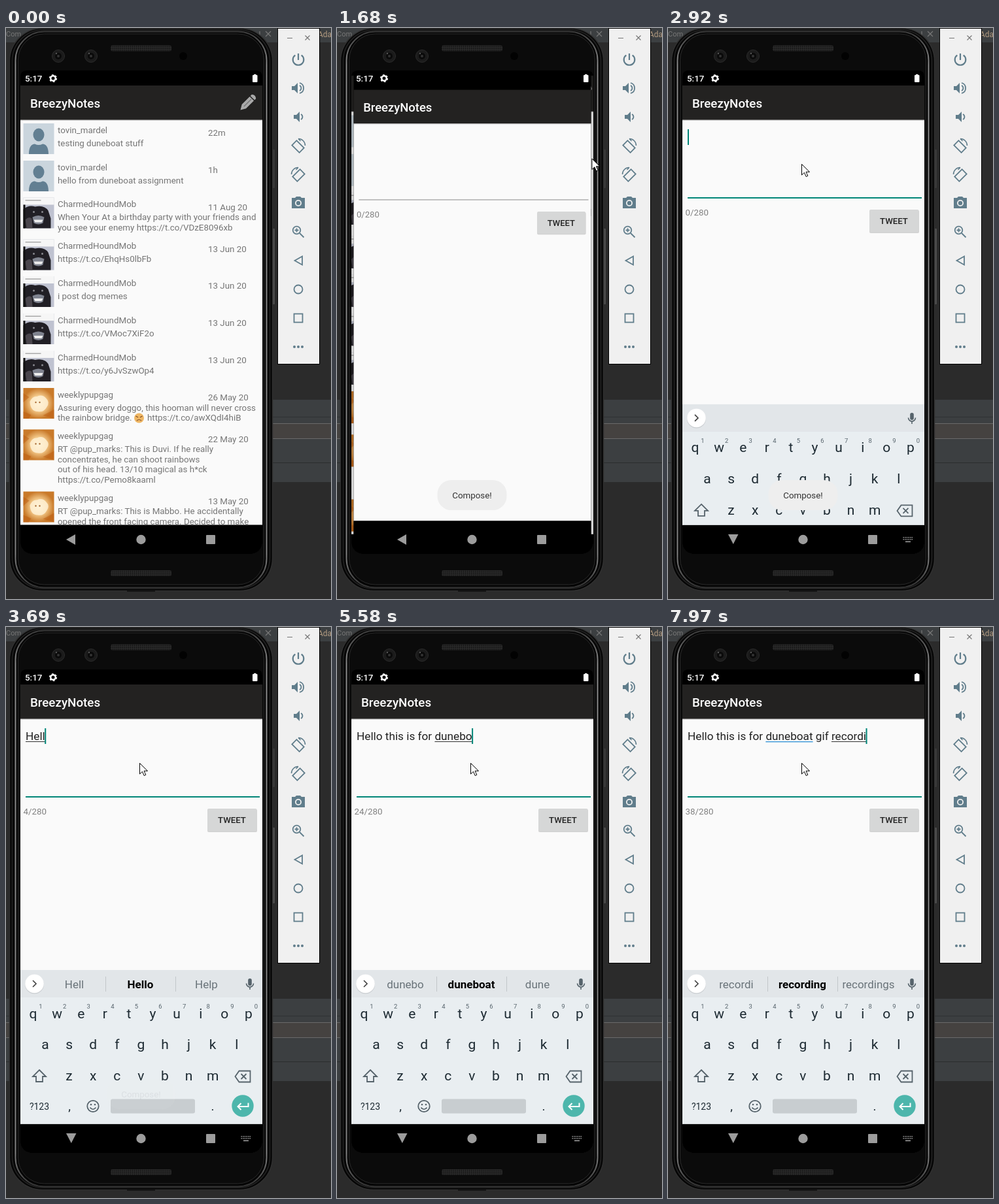
These frames come from a looping animation (497x874 px, 8000 ms). An HTML page:

```html
<!DOCTYPE html>
<html lang="en">
<head>
<meta charset="utf-8">
<title>Compose screen</title>
<style>
html, body { margin: 0; height: 100%; overflow: hidden; background: #2b2b2b; }
svg { display: block; width: 497px; height: 874px; font-family: Roboto, "Noto Sans", sans-serif; }
text { white-space: pre; }
.line { fill: none; stroke: #607d8b; stroke-width: 1.8; }
.mid { text-anchor: middle; }
</style>
</head>
<body>
<svg id="stage" viewBox="0 0 497 874" xmlns="http://www.w3.org/2000/svg"></svg>
<script>
const LOOP = 8000;
const FULL = 'Hello this is for duneboat gif recording';
// Start of each word, the word, and the alternative offered on the right
const WORDS = [[0, 'Hello', 'Help'], [6, 'this', 'that'], [11, 'is', 'it'], [14, 'for', 'from'],
  [18, 'duneboat', 'dune'], [27, 'gif', 'gift'], [31, 'recording', 'recordings']];
// Time, characters typed, mistyped extra
const KEYS = [[0, 0], [3230, 1], [3310, 2], [3540, 3], [3690, 4], [3770, 6], [3860, 7],
  [4010, 8], [4090, 9], [4160, 10], [4390, 11], [4470, 12], [4550, 13], [4620, 14], [4760, 16],
  [4840, 18], [4910, 19], [5110, 21], [5170, 22], [5410, 23], [5580, 24], [5660, 25], [5730, 26],
  [5810, 27], [6500, 27, 'b'], [6580, 27, 'bi'], [6810, 27, 'b'], [6890, 27], [6960, 28], [7040, 29],
  [7110, 30], [7190, 31], [7340, 32], [7420, 33], [7590, 34], [7660, 35], [7740, 36], [7890, 37], [7970, 38]];
// Pointer path: time, x, y
const PATH = [[70, 240, 806], [300, 300, 520], [560, 432, 68], [830, 366, 112], [980, 366, 112],
  [1450, 405, 160], [1680, 390, 200], [1780, 380, 204], [2260, 204.5, 208.5]];

const text = (x, y, s, size, fill, more = '') =>
  `<text x="${x}" y="${y}" font-size="${size}" fill="${fill}" ${more}>${s}</text>`;
const rect = (x, y, w, h, fill, more = '') =>
  `<rect x="${x}" y="${y}" width="${w}" height="${h}" fill="${fill}" ${more}/>`;
const circle = (x, y, r, fill, more = '') => `<circle cx="${x}" cy="${y}" r="${r}" fill="${fill}" ${more}/>`;
const path = (d, fill, more = '') => `<path d="${d}" fill="${fill}" ${more}/>`;
const group = (more, s) => `<g ${more}>${s}</g>`;
const stroke = (c, w) => `stroke="${c}" stroke-width="${w}"`;

function desktop() {
  return rect(0, 0, 497, 874, '#2b2b2b') + rect(0, 0, 497, 22, '#3c3f41') +
    text(0, 13, 'Com', 11, '#777') + text(477, 14, 'Ada', 12, '#b19a80') +
    path('M397 5l8 8m0-8l-8 8M388 5v8', 'none', stroke('#777', 1.2)) +
    rect(0, 569, 497, 126, '#3c3f41') + rect(0, 595, 497, 1, '#2f3133') +
    rect(-2, 605.5, 501, 23, '#454240', stroke('#6a6a6a', 1)) + rect(0, 665, 497, 1, '#2b2d2e');
}

function phone() {
  let s = rect(407, 186, 4, 59, '#3a3a3a', 'rx="1"') + rect(407, 307, 4, 116, '#4c4c4c', 'rx="1"') +
    rect(5.5, 0.5, 402, 861, '#050505', 'rx="50" ' + stroke('#303030', 1.5)) +
    rect(9.5, 3, 394, 855, 'none', 'rx="47" ' + stroke('#1f1f1f', 2)) +
    rect(14.5, 5.5, 384, 851, 'none', 'rx="44" stroke="url(#rim)" stroke-width="2"') +
    rect(18.5, 9, 376, 843, '#0b0b0b', 'rx="40" ' + stroke('#2a2a2a', 1)) +
    rect(185, 861, 43, 2, '#151515');
  for (const y of [26.5, 830]) s += rect(160, y, 93, 9, 'url(#grill)', 'rx="3"');
  for (const x of [80, 130]) {
    s += circle(x, 43, 9.5, '#1b1b1b', stroke('#2c2c2c', 1)) + circle(x, 43, 5, '#0a0a0a') +
      circle(x, 43, 2, '#333') + circle(x - 3, 39, 1.2, '#555');
  }
  return s + circle(271, 43, 6, '#020202');
}

function toolPanel() {
  const icons = [
    path('M12 3v10M7.3 5.6a8.3 8.3 0 1 0 9.4 0', 'none', 'class="line" style="stroke-width:2.2"'),
    path('M2 9v6h4l5 5V4L6 9z', '#607d8b') + path('M14 8a4.5 4.5 0 0 1 0 8M14 4a8.3 8.3 0 0 1 0 16', 'none', 'class="line"'),
    path('M5 9v6h4l5 5V4L9 9z', '#607d8b') + path('M16 8a4.5 4.5 0 0 1 0 8', 'none', 'class="line"'),
    rotateIcon(''), rotateIcon('transform="matrix(-1 0 0 1 24 0)"'),
    path('M2 4h5l2-2h6l2 2h5v16H2z', '#607d8b') + circle(12, 12, 4.1, 'none', stroke('#f0f0f0', 1.8)),
    path('M14 14l6.500 6.500M6.500 9.500h6M9.500 6.500v6', 'none', 'class="line"') + circle(9.5, 9.5, 5.8, 'none', 'class="line"'),
    path('M18 5.500v13L6.500 12z', 'none', 'class="line"'),
    circle(12, 12, 6.5, 'none', 'class="line"'),
    rect(5.5, 5.5, 13, 13, 'none', 'class="line"'),
    [6, 12, 18].map(x => circle(x, 12, 2, '#607d8b')).join('')
  ];
  return rect(415.5, 0.5, 64, 514, '#f0f0f0', stroke('#000', 1)) +
    path('M430 15.500h8M457.500 11.500l7 7m0-7l-7 7', 'none', stroke('#777', 1.2)) +
    icons.map((s, i) => group(`transform="translate(435 ${36 + 44 * i})"`, s)).join('');
}

function rotateIcon(more) {
  return group(more, rect(3.5, 8.5, 16, 10, 'none', 'class="line" transform="rotate(45 11.500 13.500)"') +
    path('M12 1.500a10.500 10.500 0 0 1 10.500 10.500M12 1.500l3.500 3.500', 'none', 'class="line" style="stroke-width:1.5"'));
}

// Avatars, 47 by 47
const person = rect(0, 0, 47, 47, '#cad5dd') +
  '<ellipse cx="23.500" cy="17.500" rx="8.500" ry="10" fill="#627f92"/>' +
  path('M8.500 47c0-11 4-15.500 9-15.500q6 3 12 0c5 0 9 4.500 9 15.500z', '#627f92');
const darkDog = rect(0, 0, 47, 47, '#bfc2d0') + rect(0, 0, 47, 11, '#f6f6f6') + rect(3, 3.5, 24, 1.5, '#aaa') +
  path('M0 18q8-7 18-4 14-3 20 6l4 12v15H0z', '#211f25') + path('M3 34q5-6 10-2l1 15H5z', '#4a464d') +
  circle(16, 22, 1.5, '#8a8a90') + circle(29, 22, 1.5, '#8a8a90') +
  path('M14 30q9-5 18 0l-2 9q-7 4-14 0z', '#7f838f') + path('M16 34h14l-2 4H18z', '#eee') +
  rect(0, 11, 3, 36, '#111');
const fireDog = rect(0, 0, 47, 47, 'url(#fire)') +
  path('M0 8l9 6-9 8zM0 36l12 5-4 6H0zM30 42l17-9v14z', '#b9570f', 'opacity=".45"') +
  path('M10 21q4-9 11-8 8-4 14 3 6 6 1 13-5 9-14 7-11 0-12-15z', '#fff3d8', 'opacity=".8"') +
  circle(19, 22, 1.2, '#a86b35') + circle(25, 22, 1.2, '#a86b35');

function list() {
  const me = 'tovin_mardel', mob = 'CharmedHoundMob', gag = 'weeklypupgag', url = 'https://t.co/';
  const rows = [
    [146, person, me, '22m', ['testing duneboat stuff']],
    [203, person, me, '1h', ['hello from duneboat assignment']],
    [259.5, darkDog, mob, '11 Aug 20', ['When Your At a birthday party with your friends and', 'you see your enemy ' + url + 'VDzE8096xb']],
    [323.5, darkDog, mob, '13 Jun 20', [url + 'EhqHs0lbFb']],
    [380, darkDog, mob, '13 Jun 20', ['i post dog memes']],
    [437, darkDog, mob, '13 Jun 20', [url + 'VMoc7XiF2o']],
    [494, darkDog, mob, '13 Jun 20', [url + 'y6JvSzwOp4']],
    [551, fireDog, gag, '26 May 20', ['Assuring every doggo, this hooman will never cross', 'the rainbow bridge.']],
    [614.5, fireDog, gag, '22 May 20', ['RT @pup_marks: This is Duvi. If he really', 'concentrates, he can shoot rainbows', 'out of his head. 13/10 magical as h*ck', url + 'Pemo8kaaml']],
    [709.5, fireDog, gag, '13 May 20', ['RT @pup_marks: This is Mabbo. He accidentally', 'opened the front facing camera. Decided to make']]
  ];
  const gray = '#757575', size = 13.35;
  return rows.map(([y, pic, name, date, lines]) =>
    group(`transform="translate(26.5 ${y})"`, pic) + text(79, y + 14.5, name, size, gray) +
    text(309, y + 19, date, size, gray) +
    lines.map((s, i) => text(79, y + 34.5 + 15.7 * i, s, size, gray)).join('')).join('') +
    text(216, 601.2, url + 'awXQdI4hiB', size, gray) + circle(203.5, 597, 7.5, '#efb765') +
    path('M198.500 594l3.500 2m6.500-2l-3.500 2M200 601q3.500-3 7 0', 'none', stroke('#7d4a26', 1.2));
}

// A window: black system bars, title bar and body
function screen(body, more) {
  return rect(22, 65, 370, 740, '#000') + rect(22, 140, 370, 620.7, '#fafafa') + body +
    rect(22, 760.7, 370, 44.3, '#000') + rect(22, 88, 370, 52.6, '#232221') +
    rect(22, 140.6, 370, 1.4, '#000', 'opacity=".14"') +
    text(37, 122, 'BreezyNotes', 18.8, '#fff', 'font-weight="500"') + more;
}

const pencil = group('transform="translate(369.500 114.500) rotate(45)"',
  path('M-4.500-9h9V8L0 15.500l-4.500-7.500zM-4.500-10.500v-3q4.500-4 9 0v3z', '#a9a9a9') +
  path('M0-8V8', 'none', stroke('#666', 1)));

const composer = rect(30, 259, 358, 2, '#008577', 'id="rule"') +
  rect(308, 279, 76, 35, '#000', 'rx="2" opacity=".16"') + rect(308, 278, 75.5, 34.5, '#d6d7d7', 'rx="2"') +
  text(345.5, 300, 'TWEET', 13.2, '#222', 'class="mid" font-weight="500"') +
  text(26.5, 287, '0/280', 13.35, '#808080', 'id="count"') +
  rect(149, 175, 0, 1.3, '#2d8fd5', 'id="flag"') + rect(30, 175, 0, 1, '#333', 'id="under"') +
  text(30, 173, '', 17.2, '#212121', 'id="typed"') + rect(30, 155, 2, 24, '#008577', 'id="caret"');

function keyboard() {
  const ink = '#1d2a32', soft = '#56636b';
  const row = (keys, x, y) => [...keys].map((c, i) => text(x + 36.6 * i, y, c, 21, ink, 'class="mid"')).join('');
  return rect(22, 525, 370, 236, '#e9eef1') + rect(22, 525, 370, 42, '#e2e6e9') +
    circle(43.5, 547, 14.5, '#c9cdd0') + circle(43.5, 546, 14.3, '#fff') +
    path('M41 541l5 5-5 5', 'none', stroke('#444', 1.7)) +
    group('id="hints"', rect(152, 535, 1, 23, '#c2c7ca') + rect(259, 535, 1, 23, '#c2c7ca') +
      text(104.5, 553, '', 17, '#697379', 'class="mid"') + text(205.5, 553, '', 17, '#000', 'class="mid" font-weight="700"') +
      text(306.5, 553, '', 17, '#697379', 'class="mid"')) +
    rect(370.2, 538, 5.6, 11, soft, 'rx="2.800"') + path('M367.500 545.500a5.500 5.500 0 0 0 11 0M373 551v4', 'none', stroke(soft, 1.6)) +
    row('qwertyuiop', 41.5, 598.5) + row('asdfghjkl', 60, 646) + row('zxcvbnm', 96.5, 694) +
    [...'1234567890'].map((c, i) => text(53 + 36.6 * i, 584, c, 9.5, soft, 'class="mid"')).join('') +
    path('M51 678l10 10h-5v8h-10v-8h-5z', 'none', stroke(soft, 1.8)) +
    path('M350.500 688l6-8.500h17v17h-17zM359.500 684l8 8m0-8l-8 8', 'none', stroke(soft, 1.8)) +
    text(51, 738.5, '?123', 14, ink, 'class="mid"') + text(97, 740, ',', 19, ink, 'class="mid"') +
    circle(133, 733.5, 8.7, 'none', stroke(soft, 1.8)) + circle(130, 731, 1.3, soft) + circle(136, 731, 1.3, soft) +
    path('M128.500 735.500q4.500 5.500 9 0', 'none', stroke(soft, 1.6)) +
    rect(160, 722.5, 129, 22, '#c8cdd0', 'rx="3"') + text(316, 740, '.', 19, ink, 'class="mid"') +
    circle(362, 733, 16.7, '#4db6ac') + path('M370.500 728.500v5.500h-16m5-5l-5 5 5 5', 'none', stroke('#fff', 2));
}

function systemIcons() {
  const gray = '#9c9c9c';
  let dots = '';
  for (let i = 0; i < 12; i++) dots += rect(359.5 + i % 6 * 2.6, 779 + (i / 6 | 0) * 3, 1.5, 1.5, gray);
  return text(29, 82, '5:17', 13.4, '#fff', 'font-weight="500"') +
    circle(72, 77, 3.7, 'none', stroke('#fff', 2.4)) +
    circle(72, 77, 5.2, 'none', stroke('#fff', 1.8) + ' stroke-dasharray="2.700 2.740"') +
    rect(377, 72, 7.5, 11, '#fff', 'rx="1"') + rect(379, 70.8, 3.5, 2, '#fff') +
    path('M92 783l14-8v16z', gray, 'id="back"') + path('M92 775h15.500l-7.700 15z', gray, 'id="down"') +
    circle(206.5, 783, 7.2, gray) + rect(306, 776, 14, 14, gray, 'rx="1"') +
    group('id="switch"', dots + rect(363, 785.5, 8, 1.6, gray));
}

const stage = document.getElementById('stage');
stage.innerHTML = `<defs>
  <clipPath id="glass"><path d="M22 75q0-10 10-10h350q10 0 10 10v708q0 22-22 22H44q-22 0-22-22z"/></clipPath>
  <clipPath id="above"><rect x="22" y="65" width="370" height="695.7"/></clipPath>
  <linearGradient id="rim" x2="0" y2="1"><stop stop-color="#3a3a3a"/><stop offset=".06" stop-color="#8a8a8a"/><stop offset=".94" stop-color="#808080"/><stop offset="1" stop-color="#333"/></linearGradient>
  <radialGradient id="fire"><stop stop-color="#ffefcf"/><stop offset=".5" stop-color="#f3c98a"/><stop offset="1" stop-color="#c97a2a"/></radialGradient>
  <pattern id="grill" width="3" height="3" patternUnits="userSpaceOnUse"><rect width="3" height="3" fill="#2b2b2b"/><circle cx="1.500" cy="1.500" r="1" fill="#111"/></pattern>
</defs>` + desktop() + phone() + group('clip-path="url(#glass)"',
  group('id="home"', screen(list(), circle(369.5, 114.5, 22, '#fff', 'id="ripple"') + pencil)) +
  rect(22, 65, 370, 740, '#000', 'id="dim"') +
  group('id="compose"', screen(composer, '')) +
  group('clip-path="url(#above)"', group('id="keys"', keyboard())) +
  systemIcons() +
  group('id="toast"', rect(153.5, 692, 106, 46, '#eeeeee', 'rx="21"') + text(206.5, 720, 'Compose!', 13.35, '#333', 'class="mid"'))
) + toolPanel() + path('M0 0v16.500l4-3.700 2.700 6.200 2.600-1.200-2.700-6h5.400z', '#fff', 'id="mouse" ' + stroke('#000', 1));

const el = {};
for (const node of stage.querySelectorAll('[id]')) el[node.id] = node;
const hints = el.hints.querySelectorAll('text');
const set = (id, name, value) => el[id].setAttribute(name, value);
const show = (id, on) => set(id, 'opacity', on ? 1 : 0);
const clamp = v => Math.max(0, Math.min(1, v));
const ramp = (t, a, b) => clamp((t - a) / (b - a));
const easeOut = u => 1 - (1 - u) * (1 - u);
const zoom = (id, k) => set(id, 'transform', `translate(207 435) scale(${k}) translate(-207 -435)`);

function drawTyping(t) {
  const [, n, extra = ''] = KEYS.findLast(k => k[0] <= t);
  const s = FULL.slice(0, n) + extra;
  const [start, word, alt] = WORDS.findLast(w => w[0] < Math.max(n, 1));
  const from = extra ? n : start;
  el.typed.textContent = s;
  el.count.textContent = s.length + '/280';
  const at = i => i ? 30 + el.typed.getSubStringLength(0, i) : 30;
  const end = at(s.length);
  set('caret', 'x', s ? end - 0.5 : 30);
  set('under', 'x', at(from));
  set('under', 'width', s && !s.endsWith(' ') ? end - at(from) : 0);
  // A finished unknown word keeps a blue line
  const flagged = n > 26;
  if (flagged) set('flag', 'x', at(18));
  set('flag', 'width', flagged ? at(26) - at(18) : 0);
  show('hints', s);
  const offer = extra ? ['bi', 'bit', 'big'] : [FULL.slice(start, n).trim(), word, alt];
  hints.forEach((h, i) => h.textContent = offer[i]);
}

function drawMouse(t) {
  show('mouse', t >= PATH[0][0]);
  const i = PATH.findLastIndex(p => p[0] <= t);
  if (i < 0) return;
  const a = PATH[i], b = PATH[i + 1] || a;
  const u = b === a ? 0 : ramp(t, a[0], b[0]);
  set('mouse', 'transform', `translate(${a[1] + (b[1] - a[1]) * u} ${a[2] + (b[2] - a[2]) * u})`);
}

function draw(t) {
  const open = ramp(t, 1488, 1788), p = easeOut(open);
  zoom('home', 1 + 0.05 * p);
  zoom('compose', 0.85 + 0.15 * p);
  set('dim', 'opacity', 0.18 * p);
  set('compose', 'opacity', clamp(open * 4));

  set('ripple', 'r', 10 + 14 * ramp(t, 980, 1150));
  set('ripple', 'opacity', t < 980 ? 0 : 0.2 * (1 - ramp(t, 1150, 1400)));
  set('toast', 'opacity', ramp(t, 1280, 1440) * (1 - ramp(t, 3440, 3710)));

  const focus = t >= 2450;
  set('rule', 'fill', focus ? '#008577' : '#9a9a9a');
  set('rule', 'height', focus ? 2 : 1.2);
  show('caret', focus && !(t >= 6270 && t < 6500));
  show('switch', focus);

  const rise = easeOut(ramp(t, 2830, 3000));
  set('keys', 'transform', `translate(0 ${236 * (1 - rise)})`);
  show('keys', rise > 0);
  show('back', rise === 0);
  show('down', rise > 0);

  drawTyping(t);
  drawMouse(t);
}

const begin = performance.now();
function tick() {
  draw((performance.now() - begin) % LOOP);
  requestAnimationFrame(tick);
}
tick();
</script>
</body>
</html>
```
